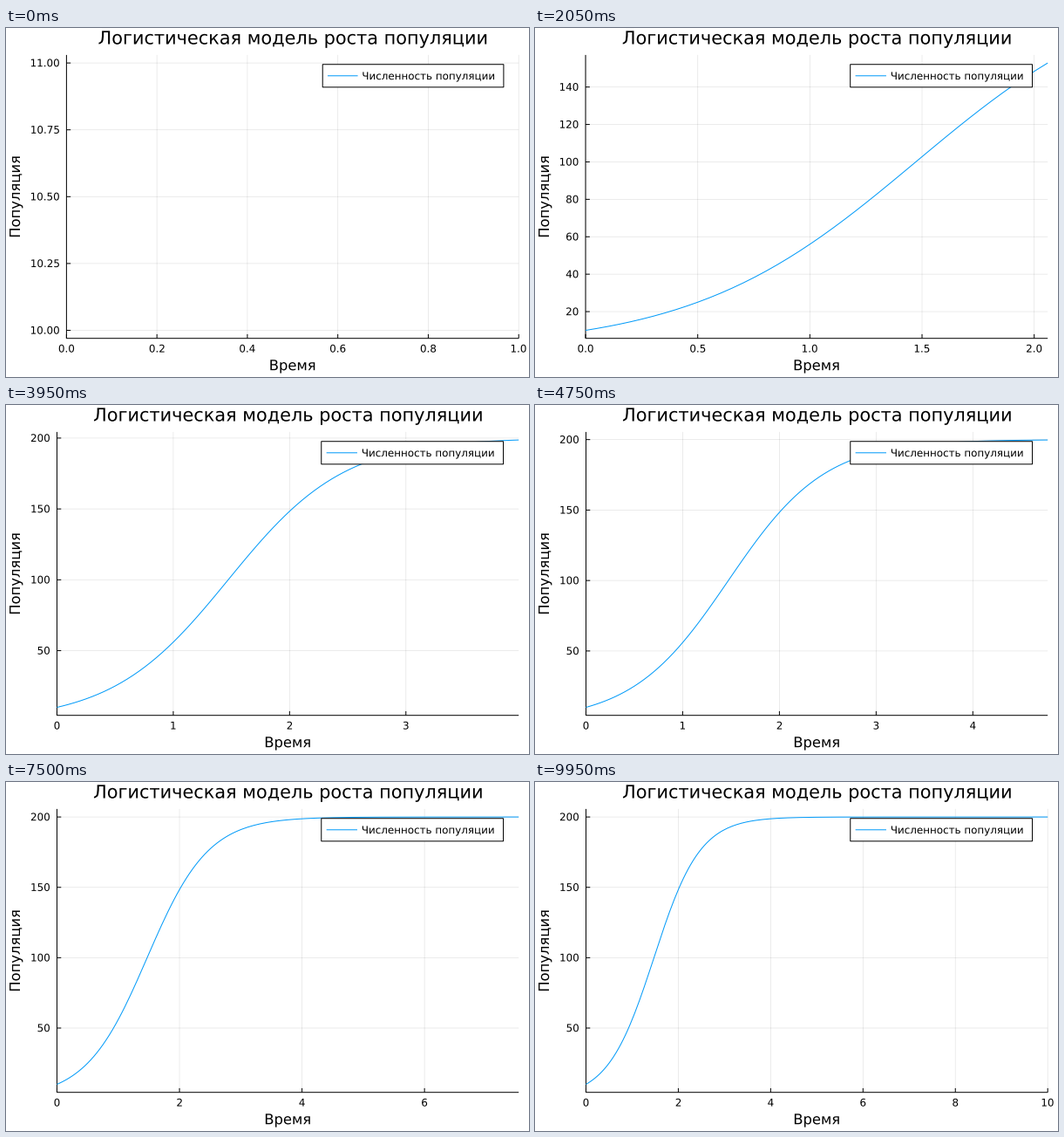
Recreate the animation shown at these times as a matplotlib script. Size 600 px wide and 400 px high, loop 10 s.

```python
import math
from functools import lru_cache

import numpy as np
import matplotlib.pyplot as plt
from matplotlib.animation import FuncAnimation
from matplotlib.patches import PathPatch, Rectangle
from matplotlib.textpath import TextPath
from matplotlib.transforms import Affine2D

plt.rcParams["font.family"] = "DejaVu Sans"

W, H, DPI = 600, 400, 100
FRAMES, INTERVAL = 200, 50
PX = 72 / DPI                      # one pixel in points

TOP, BOTTOM, RIGHT = 30.9, 355.7, 588.19
LEFT_PAD = 37.4                    # left margin besides the tick labels
TICK_LEN = 4.8
TICK_PX, GUIDE_PX, TITLE_PX = (pt * 1.4885 for pt in (8, 11, 14))
CAP = 0.729                        # cap height in em
BLUE = "#009AF9"

# Logistic growth
CAPACITY, START, RATE = 200, 10, 2
times = np.linspace(0, 10, FRAMES)
population = CAPACITY / (1 + (CAPACITY / START - 1) * np.exp(-RATE * times))

fig = plt.figure(figsize=(W / DPI, H / DPI), dpi=DPI, facecolor="white")
ax = fig.add_axes([0, 0, 1, 1])


@lru_cache(maxsize=None)
def glyphs(text, size):
    path = TextPath((0, 0), text, size=size)
    return path, path.get_extents()


def write(text, x, y, size, anchor=0.5, angle=0):
    """Draw text with its baseline at y; anchor 0, 0.5, 1 = left, centre, right."""
    path, ink = glyphs(text, size)
    place = (Affine2D().translate(-ink.x0 - anchor * ink.width, 0)
             .scale(1, -1).rotate_deg(-angle).translate(x, y))
    ax.add_patch(PathPatch(place.transform_path(path), fc="black", lw=0))


def stroke(xs, ys, color="black", width=1.0, **style):
    ax.plot(xs, ys, color=color, lw=width * PX, snap=False,
            solid_capstyle="butt", **style)


def nice_ticks(lo, hi, k_min=4, k_max=8, k_ideal=5):
    """Choose ticks by granularity, simplicity, coverage and niceness."""
    steps = [(1.0, 1.0), (5.0, 0.9), (2.0, 0.7), (2.5, 0.5), (3.0, 0.2)]
    span = hi - lo
    z = math.ceil(math.log10(span))
    best, best_score = [], -math.inf
    while 2 * k_max * 10.0 ** (z + 1) > span:
        for k in range(k_min, 2 * k_max + 1):
            for q, niceness in steps:
                step = q * 10.0 ** z
                r = math.ceil((hi - (k - 1) * step) / step)
                while r * step <= lo:
                    ticks = [(r + i) * step for i in range(k)]
                    ticks = [t for t in ticks if lo <= t <= hi]
                    n = len(ticks)
                    if k_min <= n <= k_max:
                        simple = 1 if r <= 0 and abs(r) < k else 0
                        grain = 1 - abs(n - k_ideal) / k_ideal
                        cover = 1.5 * span / ((n - 1) * step)
                        score = (grain / 4 + 1 / 6 * simple
                                 + 1 / 3 * cover + niceness / 4)
                        if score > best_score:
                            best, best_score = ticks, score
                    r += 1
        z -= 1
    return best


def tick_labels(ticks):
    for digits in range(7):
        scaled = [t * 10 ** digits for t in ticks]
        if all(abs(s - round(s)) < 1e-6 for s in scaled):
            break
    return [f"{t:.{digits}f}" for t in ticks]


def draw_legend(left):
    width = RIGHT - left
    unit = width / 45
    right = RIGHT - width / 30
    top = TOP + (BOTTOM - TOP) / 30
    height = 26.1
    mid = top + height / 2
    text_x = right - unit / 2 - 155.8
    box_x = text_x - 4 * unit
    ax.add_patch(Rectangle((box_x, top), right - box_x, height, fc="white",
                           ec="black", lw=PX, snap=False, zorder=4))
    stroke([text_x - 3.5 * unit, text_x - unit / 2], [mid, mid], BLUE, zorder=5)
    write("Численность популяции", text_x, mid + CAP * TICK_PX / 2, TICK_PX, 0)
    ax.patches[-1].set_zorder(5)


def draw(i):
    ax.clear()
    ax.set_xlim(0, W)
    ax.set_ylim(H, 0)
    ax.set_axis_off()

    x_max = times[i] if i else 1.0
    p_max = population[i] if i else START + 1.0
    mid, half = (START + p_max) / 2, (p_max - START) / 2 * 1.06
    y_lo, y_hi = mid - half, mid + half

    x_ticks, y_ticks = nice_ticks(0.0, x_max), nice_ticks(y_lo, y_hi)
    y_names = tick_labels(y_ticks)
    left = LEFT_PAD + max(glyphs(s, TICK_PX)[1].width for s in y_names)

    def to_x(t):
        return left + (RIGHT - left) * t / x_max

    def to_y(p):
        return BOTTOM - (BOTTOM - TOP) * (p - y_lo) / (y_hi - y_lo)

    grid = dict(width=0.75, alpha=0.1, zorder=1)
    for t, name in zip(x_ticks, tick_labels(x_ticks)):
        x = to_x(t)
        stroke([x, x], [TOP, BOTTOM], **grid)
        stroke([x, x], [BOTTOM, BOTTOM - TICK_LEN])
        write(name, x, 371.6, TICK_PX)
    for p, name in zip(y_ticks, y_names):
        y = to_y(p)
        stroke([left, RIGHT], [y, y], **grid)
        stroke([left, left + TICK_LEN], [y, y])
        write(name, left - 8.5, y + CAP * TICK_PX / 2 - 0.2, TICK_PX, 1)

    stroke([left, RIGHT], [BOTTOM, BOTTOM])
    stroke([left, left], [BOTTOM, TOP])
    if i:
        stroke(to_x(times[:i + 1]), to_y(population[:i + 1]), BLUE, zorder=3)

    centre = (left + RIGHT) / 2
    write("Логистическая модель роста популяции", centre, 18.5, TITLE_PX)
    write("Время", centre, 392.2, GUIDE_PX)
    write("Популяция", 16, (TOP + BOTTOM) / 2, GUIDE_PX, angle=90)
    draw_legend(left)
    return []


anim = FuncAnimation(fig, draw, frames=FRAMES, interval=INTERVAL,
                     init_func=lambda: [], repeat=True, repeat_delay=0)
plt.show()
```
